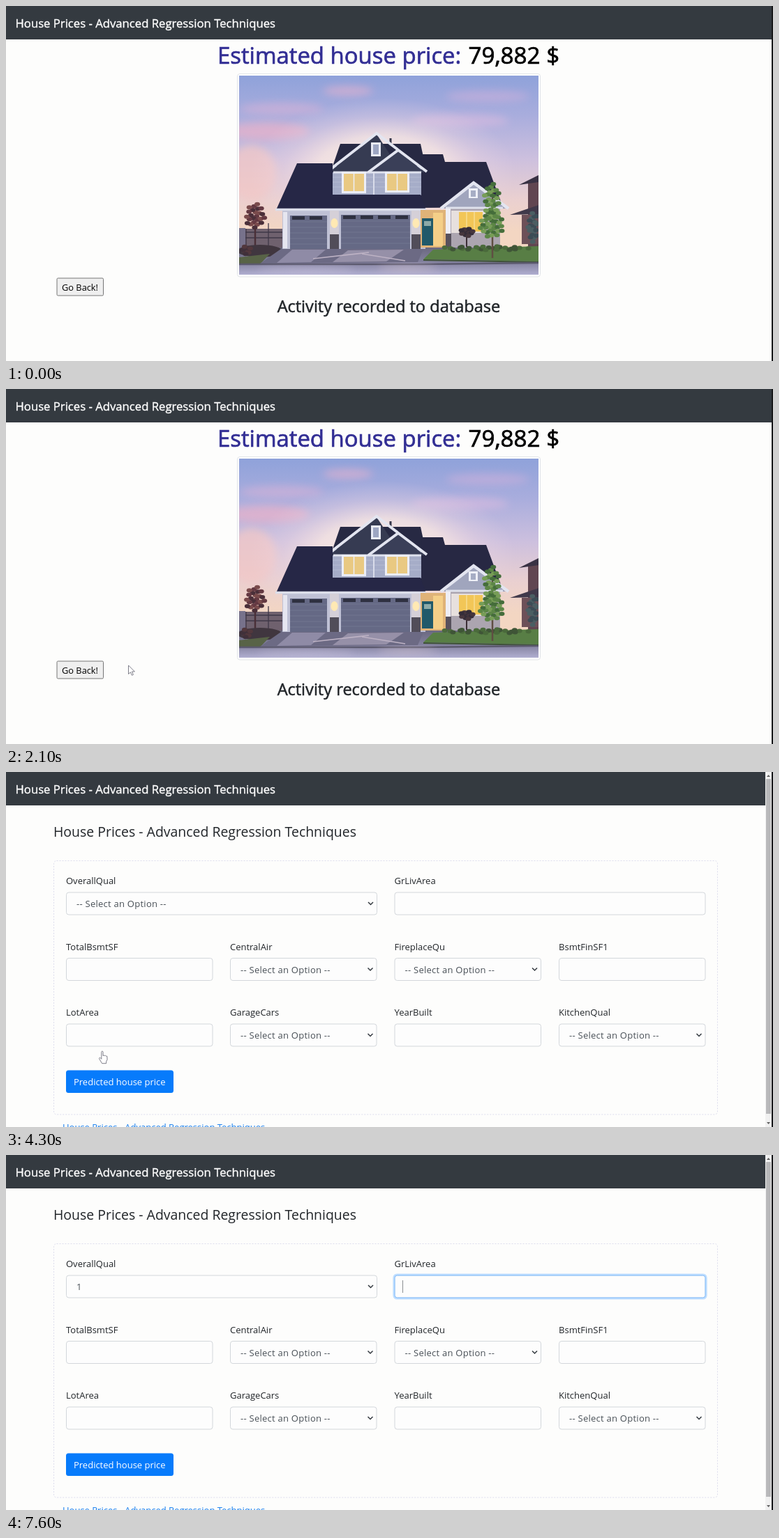
Recreate the animation shown at these times as an HTML page. Size 1099x510 px, loop 8000 ms.

```html
<!DOCTYPE html>
<html lang="en">
<head>
<meta charset="utf-8">
<title>House Prices</title>
<style>
  html, body { margin: 0; width: 100%; height: 100%; overflow: hidden; background: #fdfdfc; }
  svg { display: block; width: 100vw; height: 100vh; }
  text { font: 13px "Open Sans", "Noto Sans", sans-serif; fill: #212529; white-space: pre; }
  .medium { stroke: currentColor; stroke-width: .022em; }
  .option { fill: #495057; letter-spacing: .26px; }
  .field { fill: #fdfdfd; stroke: #d3d7db; }
</style>
</head>
<body>
<svg viewBox="0 0 1099 510">
  <defs>
    <linearGradient id="sky" x2="0" y2="1">
      <stop offset="0" stop-color="#8fa2da"/>
      <stop offset=".2" stop-color="#a9addd"/>
      <stop offset=".42" stop-color="#cdc0de"/>
      <stop offset=".62" stop-color="#ead0d0"/>
      <stop offset=".78" stop-color="#f3d6c2"/>
    </linearGradient>
    <linearGradient id="street" x2="0" y2="1">
      <stop offset="0" stop-color="#6a687f"/>
      <stop offset=".55" stop-color="#8482a0"/>
      <stop offset="1" stop-color="#b0aed0"/>
    </linearGradient>
    <radialGradient id="glow">
      <stop offset="0" stop-color="#fdf3ea"/>
      <stop offset=".5" stop-color="#fbe9e2" stop-opacity=".75"/>
      <stop offset=".75" stop-color="#f4dce2" stop-opacity=".3"/>
      <stop offset="1" stop-color="#eed8e4" stop-opacity="0"/>
    </radialGradient>
    <filter id="soft" x="-50%" y="-100%" width="200%" height="300%"><feGaussianBlur stdDeviation="6"/></filter>
    <clipPath id="photoClip"><path d="M334 100h429v286h-429z"/></clipPath>
  </defs>

  <rect width="1099" height="510" fill="#fdfdfc"/>
  <rect width="1097" height="48" fill="#343a40"/>
  <text class="medium" x="13.5" y="31" style="font-size:16.7px;fill:#fff;color:#fff">House Prices - Advanced Regression Techniques</text>

  <g id="result">
    <text class="medium" x="303" y="83" style="font-size:32.9px;fill:#322e94;color:#322e94">Estimated house price:</text>
    <text class="medium" x="662.5" y="83" style="font-size:33.2px;fill:#000;color:#000">79,882 $</text>
    <rect x="331.5" y="97.5" width="434" height="291.5" rx="3.5" fill="#fff" stroke="#e2e5e8"/>
    <g id="photo" clip-path="url(#photoClip)"></g>
    <rect id="back" x="73" y="391" width="66.5" height="25" rx="1.5" stroke="#767676"/>
    <text x="80" y="409" style="font-size:12.8px;fill:#000">Go Back!</text>
    <text class="medium" x="548.5" y="440" text-anchor="middle" style="font-size:23.6px;color:#212529">Activity recorded to database</text>
  </g>

  <g id="form">
    <text x="68" y="92.5" style="font-size:19.45px">House Prices - Advanced Regression Techniques</text>
    <rect x="68.5" y="127.5" width="951" height="364.5" rx="4" fill="none" stroke="#dcdcec" stroke-dasharray="2 2"/>
    <g id="fields"></g>
    <path id="caret" d="M568.5 180v18" stroke="#8a8d91"/>
    <rect x="86" y="428.5" width="154" height="32.5" rx="3.5" fill="#077bfb"/>
    <text x="97" y="450" style="fill:#fff">Predicted house price</text>
    <text x="81" y="514.5" style="fill:#187fee">House Prices - Advanced Regression Techniques</text>
    <path d="M1088 0h9v510h-9z" fill="#f1f1f1"/>
    <path d="M1089 10h7v481h-7z" fill="#b9b9bb"/>
    <path d="M1090 7l2.5-3 2.5 3zM1090 503l2.5 3 2.5-3z" fill="#606060"/>
  </g>

  <path d="M1097 0h2v510h-2z" fill="#17181a"/>
  <path id="arrow" d="M0 0v12.5l2.9-2.7 2 4.5 2-.9-2-4.4h4z" fill="#fff" stroke="#70707c" stroke-width=".9"/>
  <path id="hand" d="M-1.2.8c0-1.6 2.2-1.6 2.2 0v5.4l1-.8 1.3.7 1-.4 1.2.9 1.3.2.3 4.8-1.5 3v2.6h-6l-3.8-6.4c-1-1.7.7-2.6 1.8-1.3l1.2 1.3z" fill="#fff" stroke="#70707c" stroke-width=".9"/>
</svg>
<script>
const $ = id => document.getElementById(id);
const LOOP = 8000, FORM_AT = 3500;

// Static picture of the house
const poly = (points, fill) => `<polygon points="${points}" fill="${fill}"/>`;
const box = (x, y, w, h, fill) => `<rect x="${x}" y="${y}" width="${w}" height="${h}" fill="${fill}"/>`;
const oval = (x, y, rx, ry, fill, extra = '') =>
  `<ellipse cx="${x}" cy="${y}" rx="${rx}" ry="${ry}" fill="${fill}" ${extra}/>`;
const line = (d, color, w) => `<path d="${d}" fill="none" stroke="${color}" stroke-width="${w}"/>`;
const cloud = (x, y, rx, ry, fill) => oval(x, y, rx, ry, fill, 'filter="url(#soft)" opacity=".75"');
const pane = (x, y, w, h) => box(x, y, w, h, '#eceef7') + box(x + 3, y + 3, w - 6, h - 6, '#e9c982') +
  line(`M${x + w / 2} ${y}v${h}`, '#eceef7', 1.5);
const garage = (x, y, w, h) => {
  let s = box(x, y, w, h, '#656985');
  for (let i = 9; i < h; i += 8) s += line(`M${x} ${y + i}h${w}`, '#757993', .8);
  return s + `<path d="M${x + 3} ${y + 3.5}h${w - 6}" stroke="#2e3040" stroke-width="5" stroke-dasharray="18 7"/>`;
};
const pier = x => box(x, 294, 13, 34, '#d5d0d8') + box(x, 328, 13, 21, '#514d59') +
  oval(x + 6.5, 312, 5, 7, '#ffe9b4');

function foliage(x, y, rx, ry, count, colors) {
  let s = '';
  for (let i = 0; i < count; i++) {
    const a = i * 2.4, r = Math.sqrt((i + .5) / count);
    s += oval(x + Math.cos(a) * r * rx, y + Math.sin(a) * r * ry, 4, 3, colors[i % colors.length]);
  }
  return s;
}

const LEAVES = ['#5c8646', '#779d57', '#456d3b'];

$('photo').innerHTML = [
  box(334, 100, 429, 286, 'url(#sky)'),
  cloud(375, 180, 60, 13, '#e6b1ca'), cloud(490, 122, 36, 7, '#d9b0d0'),
  cloud(690, 130, 60, 8, '#c3aedb'), cloud(395, 148, 60, 9, '#ccb0d8'),
  cloud(650, 165, 70, 10, '#d2b9df'), cloud(352, 240, 36, 40, '#f3c8c6'),
  oval(540, 240, 190, 108, 'url(#glow)'),
  // surroundings
  box(334, 320, 65, 36, '#6f616e'),
  line('M334 325h62M334 333h62M344 320v28M376 312v36', '#3f3848', 1.3),
  box(334, 319, 9, 28, '#77728b'),
  line('M357 310v38', '#4a3038', 2.5),
  foliage(357, 302, 14, 18, 24, ['#643942', '#4a2f39', '#7a4b4c']),
  box(334, 347, 429, 39, 'url(#street)'),
  oval(364, 352, 32, 9, '#40363f'), foliage(345, 351, 7, 6, 8, ['#40303a', '#52383d']),
  poly('334,361 378,356 365,370 334,371', '#586347'),
  poly('748,255 763,250 763,348 748,348', '#614651'),
  poly('735,257 763,243 763,253', '#393244'),
  poly('722,300 763,286 763,299', '#40394a'),
  box(739, 300, 24, 42, '#6d5058'),
  foliage(755, 317, 7, 22, 20, ['#3c4c56', '#4b5e63']),
  // upper floor
  poly('479,198 594,198 603,240 466,236', '#272943'),
  line('M551 190v12', '#333448', 3),
  poly('596,213 626,213 629,224 688,224 712,289 592,290', '#272843'),
  box(468, 230, 127, 42, '#a6adc8'),
  line('M468 246h127M468 253h127M468 260h127', '#b8bed5', .8),
  poly('531,184 463,239 567,239', '#363b52'),
  poly('562,209 522,239 600,239', '#3a3f58'),
  line('M469 239h126', '#dfe2ee', 3),
  line('M459 239L531 183l30 23', '#e3e5f0', 4),
  line('M519 239l43-32 41 31', '#e3e5f0', 4),
  line('M527 240v32', '#d9dcea', 2),
  box(523, 196, 14, 20, '#e9ebf5'), box(526, 199, 8, 14, '#9da6c2'),
  pane(481, 238, 35, 31), pane(543, 238, 35, 30),
  // ground floor
  box(396, 291, 205, 58, '#bfc1d5'),
  poly('417,226 468,226 468,271 594,271 601,291 387,293', '#262746'),
  line('M386 292.5h216', '#dcdeea', 3.5),
  box(397, 296, 6, 52, '#e6e6f0'),
  garage(407, 301, 53, 48), garage(480, 300, 99, 49), pier(464), pier(581),
  box(594, 293, 37, 54, '#dfb378'), box(612, 297, 14, 48, '#f4cf88'),
  box(596, 305, 16, 39, '#20596a'), box(599, 309, 10, 7, '#8caaa8'),
  box(630, 288, 78, 59, '#aca5b0'), box(638, 294, 49, 32, '#e7e0de'),
  box(649, 296, 34, 28, '#f2c657'), line('M660 296v28M671 296v28', '#f9e3a1', 1.2),
  poly('670,254 627,291 716,291', '#a0a5bd'),
  line('M623 291l47-37 50 37', '#e3e5f0', 4.5),
  line('M630 290h82', '#dfe1ec', 3),
  box(663, 262, 13, 14, '#eef0f7'), box(666, 265, 7, 9, '#a6adc4'),
  box(630, 291, 7, 56, '#eeeef4'), box(630, 327, 8, 20, '#57515c'),
  // garden and drive
  poly('612,350 763,345 763,367 598,364', '#587e45'),
  foliage(690, 348, 65, 3, 26, ['#3f5537', '#4a6a3b']),
  line('M598 365l165 3', '#3f5238', 2),
  line('M660 328v18', '#3b2e35', 2), foliage(660, 325, 9, 6, 14, ['#352d39', '#46363d']),
  line('M697 255v107', '#5f4e42', 2.5),
  foliage(696, 314, 17, 20, 32, LEAVES), foliage(696, 280, 11, 27, 28, LEAVES),
  poly('394,349 598,349 590,368 364,370', '#6c6a84'),
  poly('410,350 458,350 437,368 388,369', '#8f8ba6'),
  poly('490,351 570,350 545,367 468,368', '#9690a8'),
  line('M440 363l80-9M510 356l62 10', '#bdb2c4', 1.5),
  line('M334 371h263l166-2', '#5b596e', 2.5),
  cloud(430, 380, 70, 3, '#cfc7e1'), cloud(575, 377, 42, 3, '#dbc9d3')
].join('');

// Form fields: label, column, row, columns spanned, is a select
const COLS = [86, 321, 556.5, 792], ROWS = [173, 267.5, 362];
const FIELDS = [
  ['OverallQual', 0, 0, 2, 1], ['GrLivArea', 2, 0, 2, 0],
  ['TotalBsmtSF', 0, 1, 1, 0], ['CentralAir', 1, 1, 1, 1],
  ['FireplaceQu', 2, 1, 1, 1], ['BsmtFinSF1', 3, 1, 1, 0],
  ['LotArea', 0, 2, 1, 0], ['GarageCars', 1, 2, 1, 1],
  ['YearBuilt', 2, 2, 1, 0], ['KitchenQual', 3, 2, 1, 1]
].map(([name, col, row, span, select]) =>
  ({ name, select, x: COLS[col], y: ROWS[row], w: span > 1 ? 445 : 209.5, h: 32 }));

$('fields').innerHTML = FIELDS.map(({ name, select, x, y, w, h }) => `
  <text x="${x}" y="${y - 12}">${name}</text>
  <rect class="field" x="${x + .5}" y="${y}" width="${w}" height="${h}" rx="3.5"/>
  <g id="focus${name}" fill="none">
    <rect x="${x - .8}" y="${y - 1.3}" width="${w + 2.6}" height="${h + 2.6}" rx="4.5" stroke="#bfdeff" stroke-width="2.6"/>
    <rect x="${x + .5}" y="${y}" width="${w}" height="${h}" rx="3.5" stroke="#80bdff"/>
  </g>` + (select ? `
  <text id="value${name}" class="option" x="${x + 15}" y="${y + 21}">-- Select an Option --</text>
  <path d="M${x + w - 12} ${y + 14}l3.5 3.5 3.5-3.5" fill="none" stroke="#343a40" stroke-width="1.5"/>` : '')
).join('');

// Pointer path: time, x, y
const PATH = [
  [1600, 438, 454], [2100, 175.5, 397], [2400, 152, 402], [2600, 152, 402], [2870, 138, 402],
  [4300, 138, 401.5], [5100, 217, 194], [5270, 217, 194], [5600, 205, 238],
  [5870, 205, 238], [6480, 610, 190]
];

const clamp = v => Math.max(0, Math.min(1, v));
const ramp = (t, from, to) => clamp((t - from) / (to - from));
const ease = p => p * p * (3 - 2 * p);
const show = (el, on) => el.style.display = on ? '' : 'none';
const inside = (f, x, y) => x >= f.x && x <= f.x + f.w && y >= f.y && y <= f.y + f.h;

function pointer(t) {
  let i = 0;
  while (i < PATH.length - 2 && t >= PATH[i + 1][0]) i++;
  const [t0, x0, y0] = PATH[i], [t1, x1, y1] = PATH[i + 1];
  const p = ease(ramp(t, t0, t1));
  return [x0 + (x1 - x0) * p, y0 + (y1 - y0) * p];
}

function render(t) {
  const onForm = t >= FORM_AT;
  show($('result'), !onForm);
  show($('form'), onForm);

  const [x, y] = pointer(t);
  const hovered = !onForm && x < 140;
  const hand = hovered || (onForm && t < 4330);
  const overInput = onForm && FIELDS.some(f => !f.select && inside(f, x, y));
  show($('hand'), hand);
  show($('arrow'), t >= 1600 && !hand && !overInput);
  for (const id of ['hand', 'arrow']) $(id).setAttribute('transform', `translate(${x} ${y})`);
  $('back').setAttribute('fill', hovered ? '#e3e3e3' : '#efefef');

  const moved = ramp(t, 6480, 6630);
  for (const { name } of FIELDS) {
    $('focus' + name).setAttribute('opacity',
      name === 'OverallQual' ? ramp(t, 5100, 5230) * (1 - moved) : name === 'GrLivArea' ? moved : 0);
  }
  $('valueOverallQual').textContent = t < 5870 ? '-- Select an Option --' : '1';
  show($('caret'), t >= 6500 && (t < 7000 || t >= 7570));
}

function tick(now) {
  render(now % LOOP);
  requestAnimationFrame(tick);
}
render(0);
requestAnimationFrame(tick);
</script>
</body>
</html>
```
